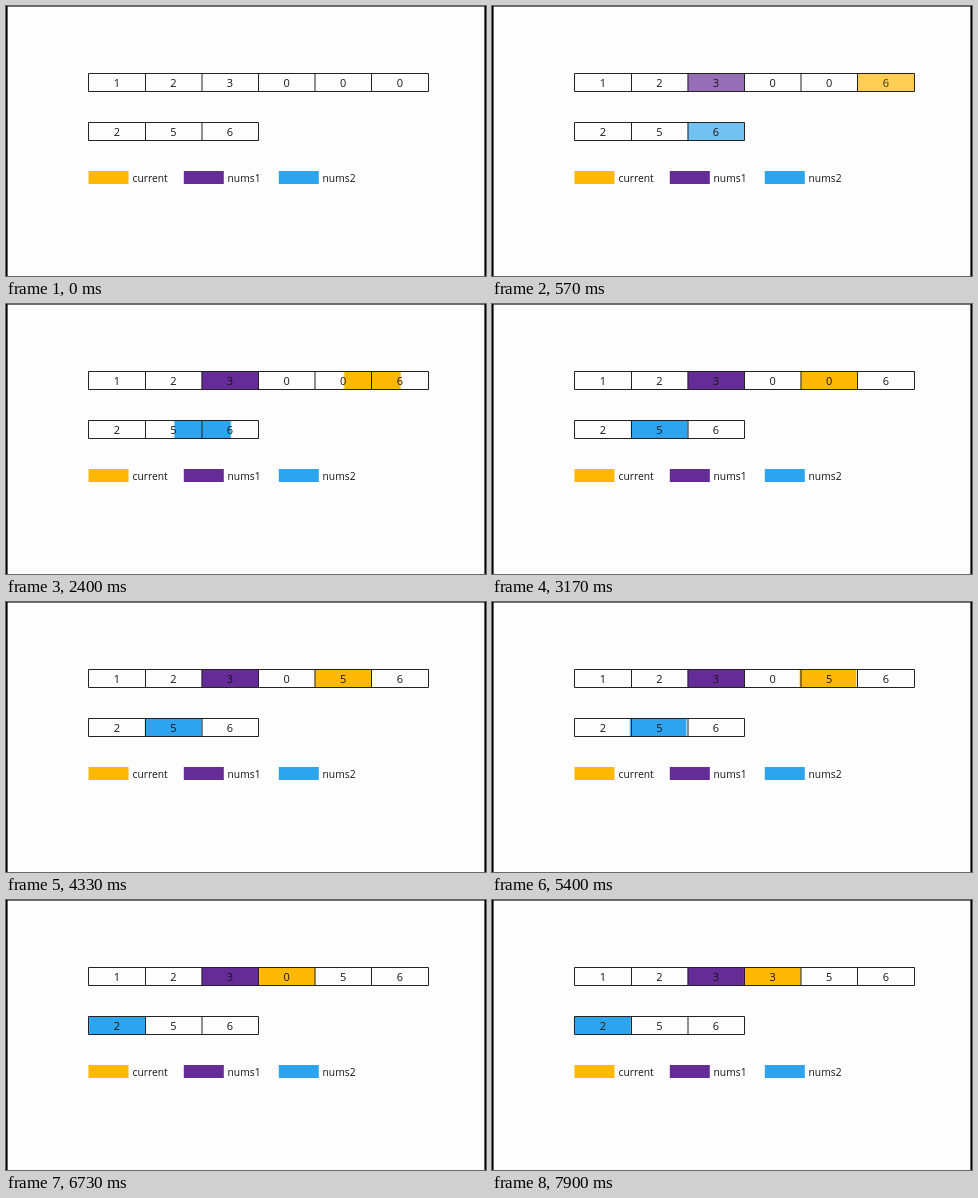
These frames come from a looping animation (480x270 px, 8000 ms). An HTML page:

```html
<!DOCTYPE html>
<html lang="en">
<head>
<meta charset="utf-8">
<title>Merging two sorted arrays</title>
<style>
  html, body { margin: 0; width: 100%; height: 100%; overflow: hidden; background: #fdfdfd; }
  svg { display: block; width: 100vw; height: 100vh; }
  text { font-family: "Open Sans", "Noto Sans", sans-serif; fill: #151515; }
  .digits { font-size: 11px; text-anchor: middle; }
  .legend { font-size: 10.3px; }
  .grid { fill: none; stroke: #222; stroke-width: 1; }
  .current { fill: #ffb904; }
  .nums1 { fill: #652b96; }
  .nums2 { fill: #2fa4ee; }

  .marks, .before, .after { animation: 8s linear infinite; }
  .before { --from: 1; --to: 0; }
  .marks, .after { --from: 0; --to: 1; }
  .first { animation-name: first; }
  .second { animation-name: second; }
  .third { animation-name: third; }
  .slide { animation: slide 8s infinite; }

  @keyframes first {
    0%, 0.9% { opacity: var(--from); }
    10%, 100% { opacity: var(--to); }
  }
  @keyframes second {
    0%, 43% { opacity: var(--from); }
    52%, 100% { opacity: var(--to); }
  }
  @keyframes third {
    0%, 88% { opacity: var(--from); }
    97%, 100% { opacity: var(--to); }
  }
  @keyframes slide {
    0%, 20.5% { transform: none; animation-timing-function: cubic-bezier(.37, 0, .63, 1); }
    39.9%, 65.7% { transform: translateX(-56.6px); animation-timing-function: cubic-bezier(.37, 0, .63, 1); }
    85%, 100% { transform: translateX(-113.2px); }
  }
</style>
</head>
<body>
<svg viewBox="0 0 480 270">
  <rect width="480" height="270" fill="#fdfdfd"/>
  <path d="M0 0H480V.8H0z" fill="#444"/>
  <path d="M0 0H1.6V270H0zM478.4 0H480V270H478.4z" fill="#000"/>

  <g class="marks first">
    <rect class="nums1" x="195.7" y="67" width="56.6" height="18"/>
    <g class="slide">
      <rect class="current" x="365.5" y="67" width="56.6" height="18"/>
      <rect class="nums2" x="195.7" y="116" width="56.6" height="18"/>
    </g>
  </g>

  <path class="grid" d="M82.5 67.5H422.5V85.5H82.5zM139.5 67.5v18M196 67.5v18M252.5 67.5v18M309 67.5v18M365.5 67.5v18
    M82.5 116.5H252.5V134.5H82.5zM139.5 116.5v18M196 116.5v18"/>

  <g class="digits">
    <text x="110.8 167.4 224" y="80.7">123</text>
    <text class="before third" x="280.6" y="80.7">0</text>
    <text class="after third" x="280.6" y="80.7">3</text>
    <text class="before second" x="337.2" y="80.7">0</text>
    <text class="after second" x="337.2" y="80.7">5</text>
    <text class="before first" x="393.8" y="80.7">0</text>
    <text class="after first" x="393.8" y="80.7">6</text>
    <text x="110.8 167.4 224" y="129.7">256</text>
  </g>

  <g class="legend">
    <rect class="current" x="82.5" y="165" width="40" height="13"/>
    <text x="126.5" y="175.5">current</text>
    <rect class="nums1" x="177.8" y="165" width="40" height="13"/>
    <text x="221.5" y="175.5">nums1</text>
    <rect class="nums2" x="272.8" y="165" width="40" height="13"/>
    <text x="316.5" y="175.5">nums2</text>
  </g>
</svg>
</body>
</html>
```
